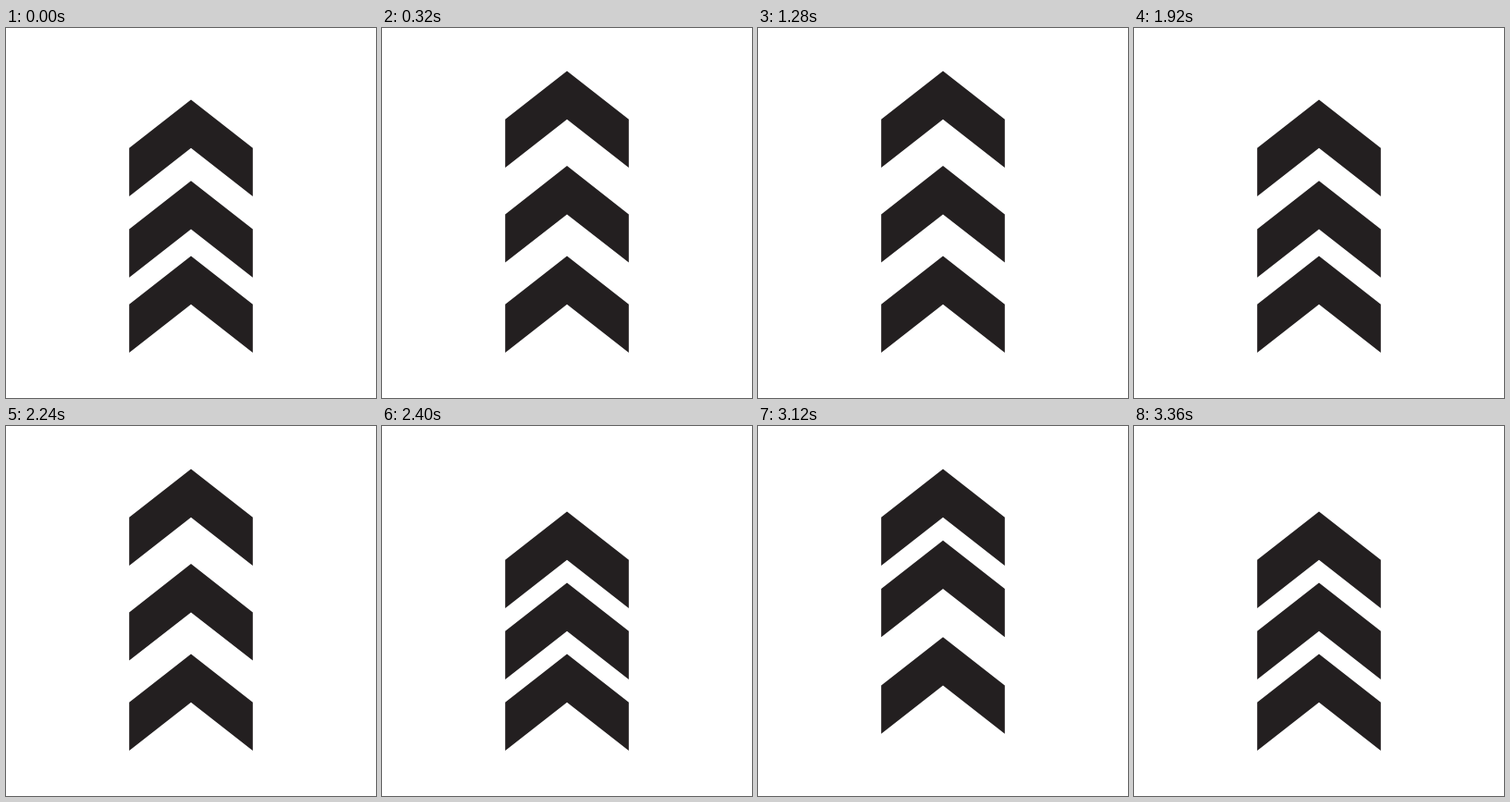
Recreate the animation shown at these times as an HTML page. Size 400 px wide and 400 px high, loop 3840 ms.

```html
<!DOCTYPE html>
<html lang="en">
<head>
<meta charset="utf-8">
<title>Rising chevrons</title>
<style>
  html, body { margin: 0; width: 100%; height: 100%; overflow: hidden; background: #fff; }
  svg { display: block; width: 100vw; height: 100vh; }
</style>
</head>
<body>
<svg viewBox="0 0 400 400" fill="#231f20">
  <defs>
    <path id="chevron" d="M200 0 L266.8 52.3 V104.5 L200 52.3 L133.2 104.5 V52.3 Z"/>
  </defs>
  <use class="arrow" href="#chevron"/>
  <use class="arrow" href="#chevron"/>
  <use class="arrow" href="#chevron"/>
</svg>
<script>
  const CYCLE = 960, STEP = 40, LIFT = 46;
  const TOP = 92.5, GAP = 77;
  const rise = { start: 0, lag: 20, length: 105 };
  const fall = { start: 360, lag: -85, length: 158 };
  const arrows = document.querySelectorAll('.arrow');

  function ease(phase, time, index) {
    const p = (time - phase.start - phase.lag * index) / phase.length;
    const x = Math.min(1, Math.max(0, p));
    return x * x * (3 - 2 * x);
  }

  // The top arrow leaves first and lands last.
  function draw(elapsed) {
    const time = (Math.floor(elapsed / STEP) * STEP + STEP) % CYCLE;
    arrows.forEach((arrow, i) => {
      const lift = LIFT * (ease(rise, time, i) - ease(fall, time, i));
      arrow.setAttribute('transform', `translate(0 ${TOP + GAP * i - lift})`);
    });
  }

  let begin;
  function tick(now) {
    begin ??= now;
    draw(now - begin);
    requestAnimationFrame(tick);
  }

  draw(0);
  requestAnimationFrame(tick);
</script>
</body>
</html>
```
